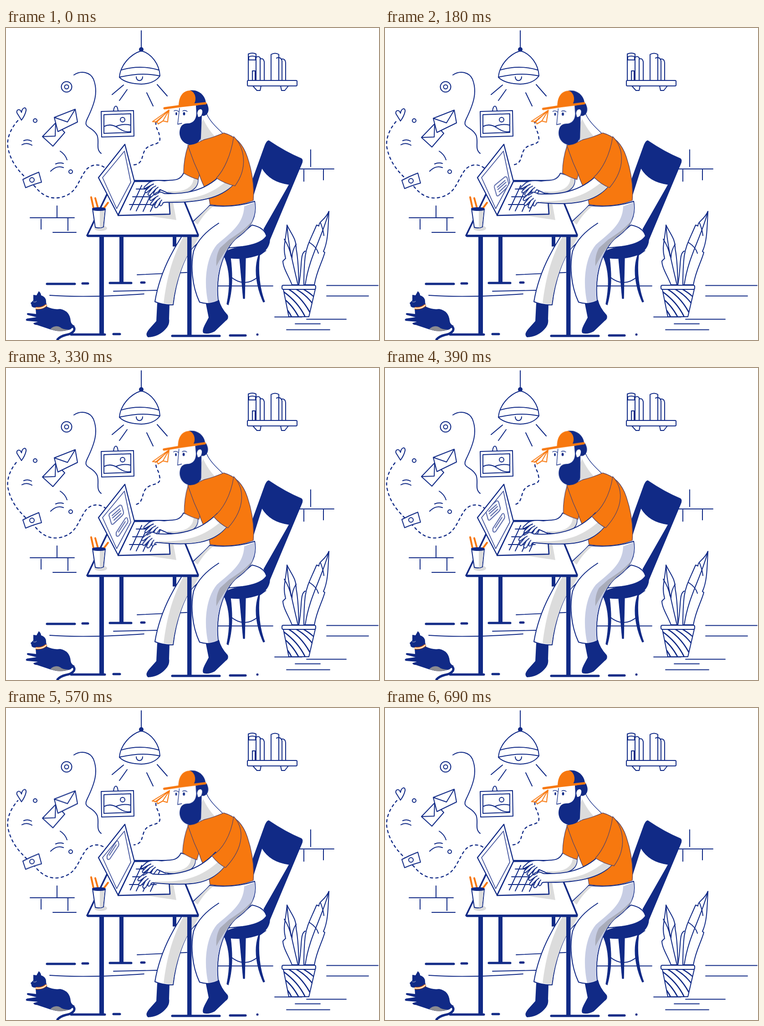
Recreate the animation shown at these times as an HTML page. Size 819 px wide and 684 px high, loop 0.72 s.

```html
<!DOCTYPE html>
<html lang="en">
<head>
<meta charset="utf-8">
<title>Working at the desk</title>
<style>
:root { --navy: #112a86; --orange: #f7780f; --grey: #dcdcdc; }
html, body { margin: 0; width: 100%; height: 100%; overflow: hidden; background: #fff; }
svg { display: block; width: 100%; height: 100%; fill: none; stroke: var(--navy); stroke-width: 2; stroke-linecap: round; stroke-linejoin: round; }
.w { fill: #fff; }
.n { fill: var(--navy); }
.o { fill: var(--orange); }
.g { fill: var(--grey); stroke: none; }
.b { fill: #c7cde4; stroke: none; }
.none { stroke: none; }
.thin { stroke-width: 1.3; }
.soft { stroke: #45569f; stroke-width: 1.8; }
.shirt { fill: var(--orange); stroke: #5c4664; stroke-width: 1.3; }
.pen { stroke: var(--orange); stroke-width: 4; }

.dash, .float, .plane, .head, .chat, .sleeve, .fore, .shade, .hand, .back, .backsleeve {
  animation: .72s linear infinite;
}
.dash { stroke-width: 2.4; stroke-dasharray: 5 7; animation-name: flow; }
.float { animation-name: bob; }
.plane { stroke: var(--orange); transform-origin: 340px 195px; animation-name: tilt; }
.head { transform-origin: 440px 220px; animation-name: nod; }
.chat { animation-name: scroll; }
.sleeve { animation-name: sleeve; }
.fore { animation-name: fore; }
.shade { animation-name: shade; }
.hand { animation-name: type; }
.back { animation-name: tap; }
.backsleeve { transform-origin: 400px 258px; animation-name: swing; }

@keyframes flow { to { stroke-dashoffset: -12; } }
@keyframes bob {
  0%, 54%, 96%, 100% { transform: none; }
  12.5%, 37.5% { transform: translateY(2px); }
  62.5% { transform: translateY(1.2px); }
  79.2% { transform: translateY(3.6px); }
}
@keyframes tilt {
  0%, 37.5%, 62.5%, 95.8%, 100% { transform: rotate(-4deg); }
  12.5%, 79.2% { transform: none; }
}
@keyframes nod {
  0%, 12.5%, 95.8%, 100% { transform: none; }
  37.5%, 62.5% { transform: rotate(-1.7deg); }
  79.2% { transform: rotate(-.7deg); }
}
@keyframes scroll {
  0% { transform: translate(26px, 49px); }
  37.5% { transform: none; }
  79.2% { transform: translate(-25px, -46px); }
  100% { transform: translate(-44px, -80px); }
}
@keyframes type {
  0%, 95.8%, 100% { transform: none; }
  12.5% { transform: translate(-11px, 1px); }
  37.5% { transform: translate(-13px, 0); }
  62.5%, 79.2% { transform: translate(-26px, 1px); }
}
@keyframes tap {
  0%, 54%, 95.8%, 100% { transform: none; }
  12.5% { transform: translate(-9px, 1px); }
  37.5% { transform: translate(-1px, 0); }
  62.5% { transform: translate(-3px, 0); }
  79.2% { transform: translate(-6px, 0); }
}
@keyframes swing {
  0%, 95.8%, 100% { transform: none; }
  12.5%, 79.2% { transform: rotate(2.2deg); }
  37.5%, 62.5% { transform: rotate(-1.5deg); }
}
@keyframes sleeve {
  0%, 95.8%, 100% { d: path("M500 238C524 262 532 306 503 346Q482 342 462 329C478 312 494 280 500 238"); }
  12.5% { d: path("M500 238C524 262 532 306 496 349Q478 344 459 327C476 312 494 280 500 238"); }
  37.5% { d: path("M500 238C523 262 529 306 490 351Q474 344 458 327C475 312 494 280 500 238"); }
  62.5%, 79.2% { d: path("M500 238C522 262 526 303 482 350Q466 342 452 324C474 312 494 280 500 238"); }
}
@keyframes fore {
  0%, 95.8%, 100% { d: path("M347 363C385 364 432 362 472 322L500 342C472 374 420 384 347 382"); }
  12.5% { d: path("M336 364C380 366 428 362 468 322L494 345C464 382 415 389 336 383"); }
  37.5% { d: path("M334 363C378 366 426 360 466 320L489 346C460 384 410 390 334 382"); }
  62.5%, 79.2% { d: path("M321 364C370 368 420 360 460 316L481 345C450 388 405 391 321 383"); }
}
@keyframes shade {
  0%, 95.8%, 100% { d: path("M352 379C425 376 455 360 484 336L500 342C472 372 420 382 352 381Z"); }
  12.5% { d: path("M342 380C415 382 450 360 478 338L494 345C464 380 415 387 342 382Z"); }
  37.5% { d: path("M340 379C412 382 446 360 472 339L489 346C460 382 410 388 340 381Z"); }
  62.5%, 79.2% { d: path("M327 380C400 384 436 364 466 337L481 345C450 386 405 389 327 382Z"); }
}
</style>
</head>
<body>
<svg viewBox="0 0 819 684">
  <defs>
    <clipPath id="screen"><path d="M260 270L212 328L243 396L274 338Z"/></clipPath>
    <clipPath id="pot"><path d="M609 573L621 633H665L679 573Z"/></clipPath>
  </defs>

  <!-- lamp -->
  <path d="M297 6V45"/>
  <circle class="n" cx="297" cy="47" r="4"/>
  <path d="M297 50C272 58 251 82 249 108Q262 122 297 123Q326 122 338 105C337 80 320 56 297 50M253 92Q295 80 335 92M249 108Q296 96 338 105M286 107C286 118 300 118 300 107M258 125L233 146M266 135L249 159M309 142L323 171M332 124L354 149"/>

  <!-- shelf -->
  <rect x="530" y="115" width="109" height="12" rx="2"/>
  <path d="M542 127L551 137H558L560 127M603 127L605 137H612L620 127M532 115V57Q541 53 549 57V115M533 63Q541 60 548 63V70H533ZM541 115V94H547V115M549 65Q553 60 558 65V115M558 68Q565 65 567 74V115M582 115V58Q591 53 599 58V115M594 66Q603 62 606 72V115M606 68Q613 67 614 76V115"/>

  <!-- framed picture -->
  <path d="M209 183L280 181L281 237L210 239ZM215 190L274 188V229L215 231ZM236 182C238 168 244 168 246 181M215 216Q230 208 246 219T274 227M241 216Q256 209 274 213"/>
  <circle cx="256" cy="201" r="5"/>

  <!-- doodles -->
  <path d="M149 103C165 92 185 97 192 112C203 140 195 165 178 200C168 220 190 215 200 235C206 250 196 265 209 275"/>
  <circle cx="133" cy="129" r="11.5"/><circle cx="133" cy="129" r="4.5"/>
  <circle cx="64" cy="203" r="4"/><circle cx="142" cy="315" r="4"/>
  <path d="M35 256Q45 250 57 257M39 247Q48 243 56 248M119 270Q130 277 134 289M98 314Q112 300 126 306M109 298Q118 294 126 297"/>
  <path class="dash" d="M26 203C8 223 0 247 5 266C14 305 40 325 63 347C80 368 97 375 117 372C155 365 156 339 175 312C187 297 207 297 219 308M281 300C302 298 297 279 306 266C318 250 343 260 337 237C336 224 326 219 330 203"/>
  <g class="float">
    <path class="w" d="M34 202L24 186C22 178 31 176 34 185C36 173 45 172 44 181Q42 191 34 202Z"/>
    <path class="w" d="M80 238L109 208L129 229L103 259ZM80 238L108 237L109 208"/>
    <path class="w" d="M106 196L152 178L157 206L114 227ZM106 196L135 206L152 178"/>
    <path class="w" d="M37 332Q54 323 72 316L78 338Q62 342 43 350Z"/>
    <circle cx="57" cy="333" r="5"/>
  </g>

  <!-- bricks and floor -->
  <path d="M53 416H150M112 390V416M77 419V441M136 416V444M103 448H154M645 309H720M669 267V304M654 311V336M697 310V333"/>
  <path d="M460 565.5H586M704 564.5H817M704 587.5H796M590 633.5H650M660 638.5H747M635 648.5H690M616 661.500H711M288 541L397 536M96 586Q180 592 303 583M236 577L332 575" stroke-width="1.8"/>
  <path d="M90 561H151M168 560H180M228 559H275M297 558H304M143 672H217M236 671H250M365 675H469M492 674H526M552 672V672" stroke-width="5"/>

  <!-- plant -->
  <g class="w">
    <path d="M677 563C683 530 693 517 700 492L697 490C706 470 707 450 709 402C700 422 687 423 687 434L682 432C668 465 661 475 657 500C654 525 654 545 654 563Z"/>
    <path d="M628 563C620 543 608 525 608 511L614 505C607 480 614 470 617 432C626 451 638 463 637 483C643 515 642 540 643 563Z"/>
    <path d="M709 402C695 458 666 500 657 563M691 428Q697 444 698 455M666 470Q682 480 686 494M617 432C620 480 629 510 641 563M637 474Q628 488 628 504M611 463Q623 482 626 500M643 563C651 520 645 495 657 489"/>
    <rect x="606" y="564" width="74" height="9" rx="3"/>
    <path d="M609 573L621 633H665L679 573Z"/>
  </g>
  <g clip-path="url(#pot)" stroke-width="2.6">
    <path d="M598 586Q627 601 646 640M600 572Q642 598 660 640M616 570Q652 590 672 633M632 570Q662 585 679 613M648 570Q668 580 684 597M602 604Q620 615 630 640"/>
  </g>

  <!-- chair -->
  <g class="n thin">
    <path d="M577 247Q614 272 648 286Q653 289 649 298L578 467L566 441L622 343Q580 338 562 307L541 373V334L567 262Q572 247 577 247Z"/>
    <path d="M469 500Q487 482 530 478Q560 472 573 455L579 466Q577 486 556 497Q515 512 469 500Z"/>
    <path d="M480 502L493 504C498 545 497 575 488 607L485 605C494 560 491 530 480 502ZM513 505H526L524 593H521ZM571 488L557 498C552 535 558 575 568 600L565 601C551 570 543 530 555 497Z"/>
  </g>
  <path class="w" d="M540 432Q567 437 572 456Q560 474 520 479L480 483Z"/>
  <path d="M494 546Q524 570 553 546"/>

  <!-- shoes and trousers -->
  <path class="n" d="M333 604L358 607L357 638Q359 650 350 659Q335 676 312 677Q306 672 314 662L331 643Z"/>
  <path class="n" d="M439 600L467 597Q471 614 486 630Q489 637 481 642L458 664Q445 671 434 668Q431 664 437 652L446 635Z"/>
  <path class="w" d="M447 389C432 408 397 430 384 460C358 500 336 545 327 600Q346 608 367 607C373 553 393 497 412 480L467 428"/>
  <path class="g" d="M390 457C368 497 354 540 346 603L366 606C373 553 393 499 412 479L424 457Z"/>
  <path class="w" d="M447 389Q500 395 546 380C553 418 532 444 504 462C482 485 459 530 466 598Q446 608 425 601C408 565 405 520 412 489Q424 455 467 428"/>
  <path class="b" d="M523 391L546 382C552 418 531 443 504 461C482 484 458 530 464 598L444 603C434 560 438 505 463 475C492 450 522 430 523 391Z"/>
  <path fill="#a9acba" stroke="none" d="M543 419C530 438 508 452 490 464L470 482Q460 500 462 522Q484 480 510 457Q535 440 543 419Z"/>
  <path class="g" d="M447 390L413 424L421 431Q437 403 456 391Z"/>

  <!-- table -->
  <g class="n none">
    <rect x="205" y="456" width="10" height="217"/><rect x="398" y="456" width="9.5" height="219"/>
    <rect x="249" y="456" width="9" height="103"/><rect x="366" y="456" width="8" height="23"/>
  </g>
  <path class="w" d="M178 455L236 335H373L422 454Z" stroke-width="3.6"/>
  <path d="M180 456H421" stroke-width="4.6"/>
  <path class="g" d="M300 410L374 421L367 383L356 380Z"/>

  <!-- pencil cup -->
  <ellipse class="g" cx="208" cy="439" rx="14" ry="6"/>
  <path class="pen" d="M187 371L192 394M196 373L202 395M224 383L215 395"/>
  <path class="w" d="M190 396L196 437Q205 440 214 436L218 397Z"/>
  <path class="g" d="M206 400L217 399L213 436L206 438Z"/>
  <ellipse class="n" cx="204" cy="397" rx="14" ry="3"/>

  <!-- laptop -->
  <path class="w" d="M282 336H355L360 408L246 411Z" stroke-width="2.6"/>
  <path d="M283 335.500H374" stroke-width="4"/>
  <path d="M286 353H350M278 370H350M271 387H330M298 345L273 399M313 345L286 401M327 345L301 402M341 350L317 402"/>
  <path class="w" d="M261 255L203 328L246 410L282 336Z" stroke-width="2.3"/>
  <path class="w soft" d="M260 270L212 328L243 396L274 338Z"/>
  <g clip-path="url(#screen)">
    <g class="chat soft">
      <path d="M232 335Q230 331 233 328L255 310Q259 309 260 314L263 325Q264 329 260 333L241 351Q237 354 236 349ZM238 333L255 318M239 338L257 322M242 343L258 328"/>
      <path d="M247 370L267 339Q271 335 272 341Q274 347 271 350L253 377Q249 380 247 376ZM252 369L267 346"/>
    </g>
  </g>

  <!-- far arm -->
  <g class="back">
    <path class="w" d="M340 337C360 330 380 340 390 318L421 326C426 352 402 370 354 361"/>
    <path class="g" d="M354 357C390 362 412 350 412 328L421 329C425 351 402 368 354 360Z"/>
    <path class="w" d="M347 335Q324 332 314 339L304 348Q301 353 307 351L318 345L306 357Q304 363 310 360L322 350L312 363Q311 369 317 366L329 353L324 362Q325 368 331 363L338 354L356 362"/>
    <path d="M318 345L324 342M322 350L329 346M329 353L334 349"/>
  </g>
  <path class="shirt backsleeve" d="M400 257Q390 287 390 318Q406 328 422 332L430 300Z"/>

  <!-- neck and torso -->
  <path class="w thin" d="M426 180L441 189C447 203 460 216 476 231L428 250Z"/>
  <path class="g" d="M426 194L430 192C436 208 447 226 459 238L428 249Z"/>
  <path class="shirt" d="M399 257Q420 253 434 245Q458 239 478 230Q516 240 530 283C541 316 545 350 543 378Q500 395 448 387C446 362 430 343 425 322L413 295Z"/>

  <!-- near arm -->
  <path class="w fore"/>
  <path class="g shade"/>
  <g class="hand">
    <path class="w" d="M348 363Q338 357 330 361L317 372Q313 378 319 378L329 371L318 384Q316 390 322 388L332 378L326 390Q327 397 333 392L339 381L337 388Q341 393 345 383L349 382"/>
    <path d="M329 371L334 368M332 378L338 373M339 381L342 377M327 366L336 361"/>
  </g>
  <path class="shirt sleeve"/>

  <!-- paper plane -->
  <path class="plane w" d="M321 204L359 181L354 207L344 204L333 210L331 205ZM331 205L359 181L344 204M327 206L350 189"/>

  <!-- head -->
  <g class="head">
    <path class="w none" d="M381 174L378 211L386 222H422L438 190L437 167Z"/>
    <path class="thin" d="M381 176L377 211L386 209M388 182Q393 179 398 183M369 182Q373 179 379 183"/>
    <ellipse class="n none" cx="391" cy="188" rx="2.400" ry="3.600"/>
    <ellipse class="n none" cx="374" cy="188" rx="1.800" ry="3.200"/>
    <path class="n none" d="M417 170L441 165Q449 181 440 190Q435 194 430 192L428 240Q424 255 403 256C387 253 378 238 382 222Q385 208 402 209Q417 206 418 188Z"/>
    <path class="w none" d="M420 187Q421 178 428 178Q433 180 430 189Q428 195 422 195Z"/>
    <path class="n none" d="M403 137C424 134 438 149 439 165L409 169Z"/>
    <path class="o none" d="M379 172C379 149 389 137 405 137C417 142 419 158 412 168Z"/>
    <path d="M348 176L384 171L438 165" stroke="var(--orange)" stroke-width="5"/>
  </g>

  <!-- cat -->
  <path class="n none" d="M72 577Q77 581 77 586Q89 590 88 601L90 611Q104 618 119 616Q140 620 142 642Q143 650 151 653L141 661Q119 668 98 661L68 651Q61 651 60 647L70 644L46 642Q41 640 46 637L67 634L47 629Q44 625 49 625L66 627L65 613Q55 613 56 607L54 603L60 597L60 585L67 586Z"/>
  <path d="M143 653Q153 656 149 664Q144 671 131 673Q119 676 113 683" stroke-width="5"/>
  <path class="none" fill="#8b8b91" d="M97 660Q108 650 119 656Q124 661 137 661Q119 669 97 660Z"/>
  <path d="M65 614Q80 616 89 607" stroke="var(--orange)" stroke-width="5" stroke-linecap="butt"/>
  <path d="M66 614Q80 616 88 608" stroke="#fff" stroke-width="1.8"/>
  <path d="M60 600Q64 602 67 599" stroke="#8690bb" stroke-width="1.2"/>
</svg>
</body>
</html>
```
